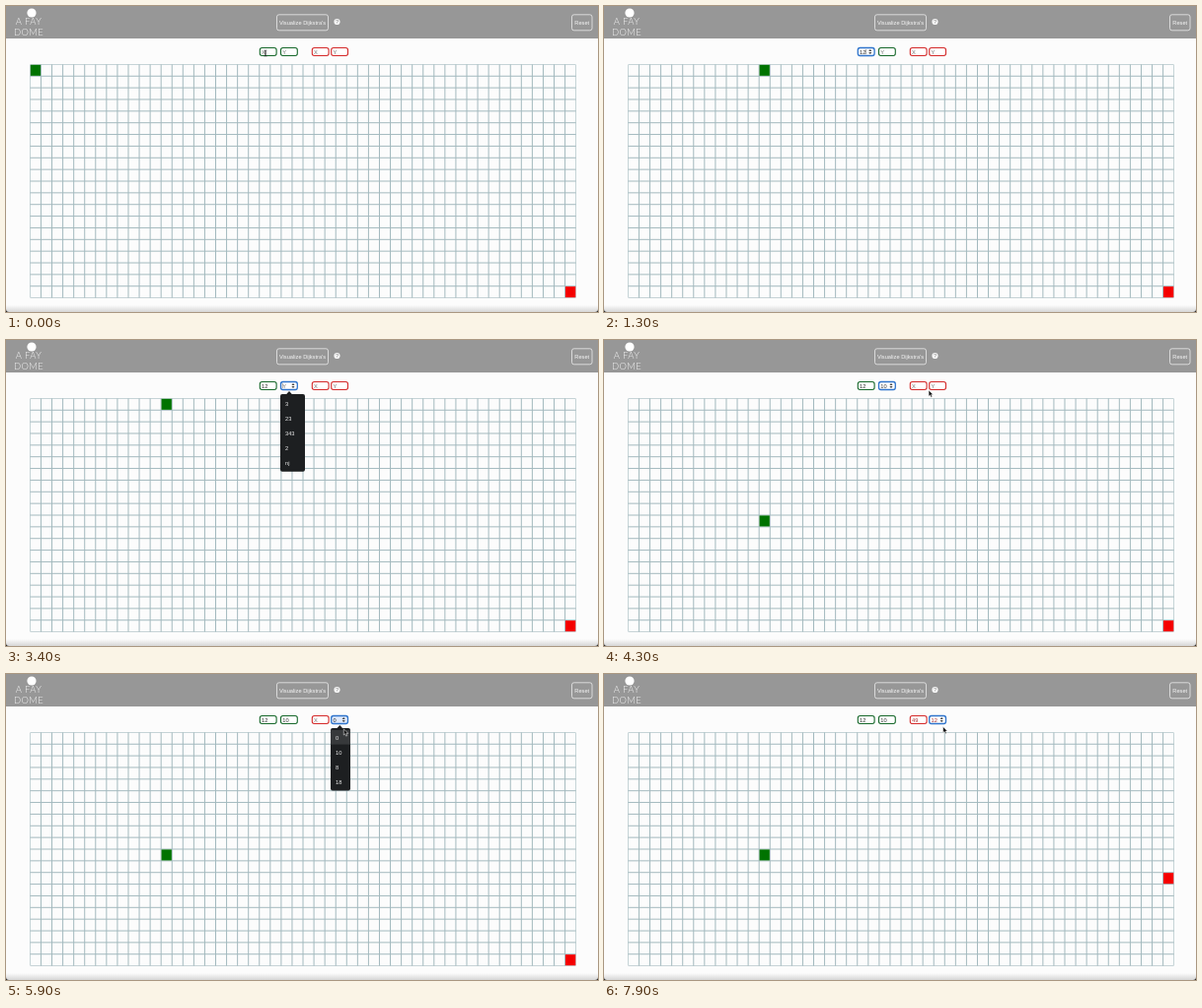
An HTML page for the animation above (8 s loop, 600 by 311 pixels).

```html
<!DOCTYPE html>
<html lang="en">
<head>
<meta charset="utf-8">
<title>Path finder grid</title>
<style>
  html, body { margin: 0; width: 100%; height: 100%; overflow: hidden; background: #fcfcfc; }
  svg { display: block; width: 600px; height: 311px; }
  text { font: 5.7px "Liberation Sans", Arial, sans-serif; }
  .bar text { fill: #f6f6f6; }
  .bar .brand { font: 300 9.4px Lato, sans-serif; letter-spacing: .4px; text-anchor: middle; }
  .btn { fill: none; stroke: #f0f0f0; stroke-width: .75; }
  .menu text { fill: #eee; }
</style>
</head>
<body>
<svg id="stage" viewBox="0 0 600 311">
  <defs>
    <linearGradient id="shade" x2="0" y2="1">
      <stop offset="0" stop-color="#fcfcfc"/>
      <stop offset="1" stop-color="#d6d6d6"/>
    </linearGradient>
  </defs>
  <rect width="600" height="311" fill="#fcfcfc"/>
  <rect y="304" width="600" height="7" fill="url(#shade)"/>
  <path d="M0 308V311H3Q0 311 0 308M600 308V311H597Q600 311 600 308" fill="#222"/>
  <g class="bar">
    <rect width="600" height="33" fill="#979797"/>
    <circle cx="26" cy="7" r="4.6" fill="#fff"/>
    <text class="brand" x="23" y="19.3">A FAY</text>
    <text class="brand" x="23" y="30.4">DOME</text>
    <rect class="btn" x="274.5" y="8.8" width="52" height="16" rx="2.2"/>
    <text x="276.9" y="18.6">Visualize Dijkstra's</text>
    <circle cx="335.5" cy="16" r="3.1" fill="#f6f6f6"/>
    <text x="335.5" y="18" text-anchor="middle" style="fill:#888">?</text>
    <rect class="btn" x="573.5" y="8.8" width="20.5" height="16" rx="2.2"/>
    <text x="576.3" y="18.6">Reset</text>
  </g>
  <path id="grid" fill="none" stroke="#a3b9be"/>
  <rect id="frame" fill="none" stroke="#a3b9be" stroke-width=".6"/>
</svg>
<script>
const LOOP = 8000, COLS = 50, ROWS = 20, LEFT = 24.4, TOP = 59.4, CW = 11.065, CH = 11.86;
const stage = document.getElementById('stage');

function add(tag, attrs, parent = stage, content) {
  const el = document.createElementNS('http://www.w3.org/2000/svg', tag);
  set(el, attrs);
  if (content !== undefined) el.textContent = content;
  return parent.appendChild(el);
}
function set(el, attrs) {
  for (const k in attrs) el.setAttribute(k, attrs[k]);
}
const show = (el, on) => el.setAttribute('visibility', on ? 'visible' : 'hidden');
const during = (t, spans) => spans.some(([a, b]) => t >= a && t < b);
// latest value of a stepped track
const step = (t, track) => track.reduce((v, k) => t >= k[0] ? k[1] : v, track[0][1]);

// neighbouring cell borders make full lines, the rim is a single border
let lines = '';
for (let c = 1; c < COLS; c++) lines += `M${LEFT + c * CW} ${TOP}v${ROWS * CH}`;
for (let r = 1; r < ROWS; r++) lines += `M${LEFT} ${TOP + r * CH}h${COLS * CW}`;
document.getElementById('grid').setAttribute('d', lines);
set(document.getElementById('frame'), { x: LEFT + .3, y: TOP + .3, width: COLS * CW - .6, height: ROWS * CH - .6 });

const cell = fill => add('rect', { width: CW - .8, height: CH - .8, fill });
const home = cell('#007300'), goal = cell('#f50000');
const place = (el, col, row) => set(el, { x: LEFT + .4 + col * CW, y: TOP + .4 + row * CH });

// value tracks, focus span and visible caret spans per input
const fields = [
  { x: 257.3, color: '#17682b', ink: '#333', focus: [300, 2100],
    track: [[0, 'X'], [800, '1'], [1000, '12']], caret: [[300, 1500]] },
  { x: 278.5, color: '#17682b', ink: '#333', focus: [2100, 5200],
    track: [[0, 'Y'], [3500, '1'], [3700, '10']], caret: [[2100, 2600], [3100, 3900], [4400, 4900]] },
  { x: 310.3, color: '#d42a2a', ink: '#a33', focus: [LOOP, LOOP],
    track: [[0, 'X'], [7300, '49']], caret: [] },
  { x: 329.7, color: '#d42a2a', ink: '#a33', focus: [5200, LOOP],
    track: [[0, 'Y'], [5700, '0'], [7300, '12']], caret: [[5200, 5700]] }
];
for (const f of fields) {
  f.box = add('rect', { x: f.x, y: 42.5, width: 16.8, height: 8, rx: 2.2 });
  f.text = add('text', { x: f.x + 1.8, y: 48.5 });
  f.caret.el = add('rect', { y: 44, width: .5, height: 5, fill: '#555' });
  const m = f.x + 12.5;
  f.spin = add('path', { d: `M${m - 1.6} 45.9l1.6-1.9 1.6 1.9zM${m - 1.6} 47.1l1.6 1.9 1.6-1.9z`, fill: '#444' });
}

function menu(x, width, tip, items, spans) {
  const g = add('g', { class: 'menu' }), height = 3.2 + items.length * 15.1;
  add('rect', { x, y: 55, width, height, rx: 2, fill: '#1d1f21' }, g);
  add('path', { d: `M${tip - 3} 55.2l3-3.2 3 3.2z`, fill: '#1d1f21' }, g);
  const hover = add('rect', { x, y: 57, width, height: 14.6, fill: '#37393b' }, g);
  items.forEach((s, i) => add('text', { x: x + 5, y: 66.5 + i * 15.1 }, g, s));
  return { g, hover, spans };
}
const menus = [
  menu(257, 20, 266, ['12', '4', '23', '0'], [[300, 800]]),
  menu(278, 25, 287, ['3', '23', '343', '2', 'nj'], [[2100, 3500]]),
  menu(329, 20, 338.3, ['0', '10', '8', '18'], [[5300, 7300]])
];

const beam = add('path', { d: 'M-1.3-3.2Q0-3.2 0-2.2V2.2Q0 3.2-1.3 3.2M1.3-3.2Q0-3.2 0-2.2V2.2Q0 3.2 1.3 3.2',
  fill: 'none', stroke: '#222', 'stroke-width': .7 });
const arrow = add('path', { d: 'M0 0V6.2L1.4 5 2.4 7.3 3.6 6.8 2.6 4.6H4.5Z',
  fill: '#111', stroke: '#fff', 'stroke-width': .5 });

const path = [[0, 263, 48], [1500, 263, 48], [1900, 283, 47], [4100, 288, 46.5], [4300, 329, 51],
  [4500, 345, 54], [4700, 338, 47], [5200, 338, 47], [5700, 342.3, 55.8], [7299, 342.3, 55.8], [7300, 343.6, 53.5]];
const hidden = [[800, 1500], [2900, 4100]];

function pointer(t) {
  const i = path.findIndex(k => k[0] > t);
  if (i < 0) return path[path.length - 1].slice(1);
  const [t0, x0, y0] = path[i - 1], [t1, x1, y1] = path[i], u = (t - t0) / (t1 - t0);
  return [x0 + (x1 - x0) * u, y0 + (y1 - y0) * u];
}

function draw(t) {
  const [px, py] = pointer(t), away = during(t, hidden);
  let overField = false;
  for (const f of fields) {
    const value = step(t, f.track), filled = /\d/.test(value);
    const over = !away && py < 50.5 && px >= f.x && px <= f.x + 17;
    const focused = during(t, [f.focus]);
    const preview = f === fields[3] && value === '0';
    overField = overField || over;
    set(f.box, { stroke: focused ? '#2f74cc' : f.color, 'stroke-width': focused ? 1.3 : 1.1,
      fill: preview ? '#dfeafd' : '#fff' });
    f.text.textContent = value;
    f.text.setAttribute('fill', preview ? '#222' : filled ? f.ink : '#757575');
    f.caret.el.setAttribute('x', f.x + 1.8 + (filled ? value.length * 3.17 : -.4));
    show(f.caret.el, during(t, f.caret));
    show(f.spin, focused || over && t >= 100);
  }
  for (const m of menus) {
    const open = during(t, m.spans);
    show(m.g, open);
    show(m.hover, open && !away && py > 55);
  }
  place(home, step(t, [[0, 0], [800, 1], [1000, 12]]), step(t, [[0, 0], [3500, 1], [3700, 10]]));
  place(goal, 49, step(t, [[0, 19], [7300, 12]]));
  show(beam, !away && overField);
  show(arrow, !away && !overField);
  const move = { transform: `translate(${px} ${py})` };
  set(beam, move);
  set(arrow, move);
}

// inherited visibility keeps a closed menu's highlight hidden as well
function tick() {
  draw(performance.now() % LOOP);
  requestAnimationFrame(tick);
}
tick();
</script>
</body>
</html>
```
